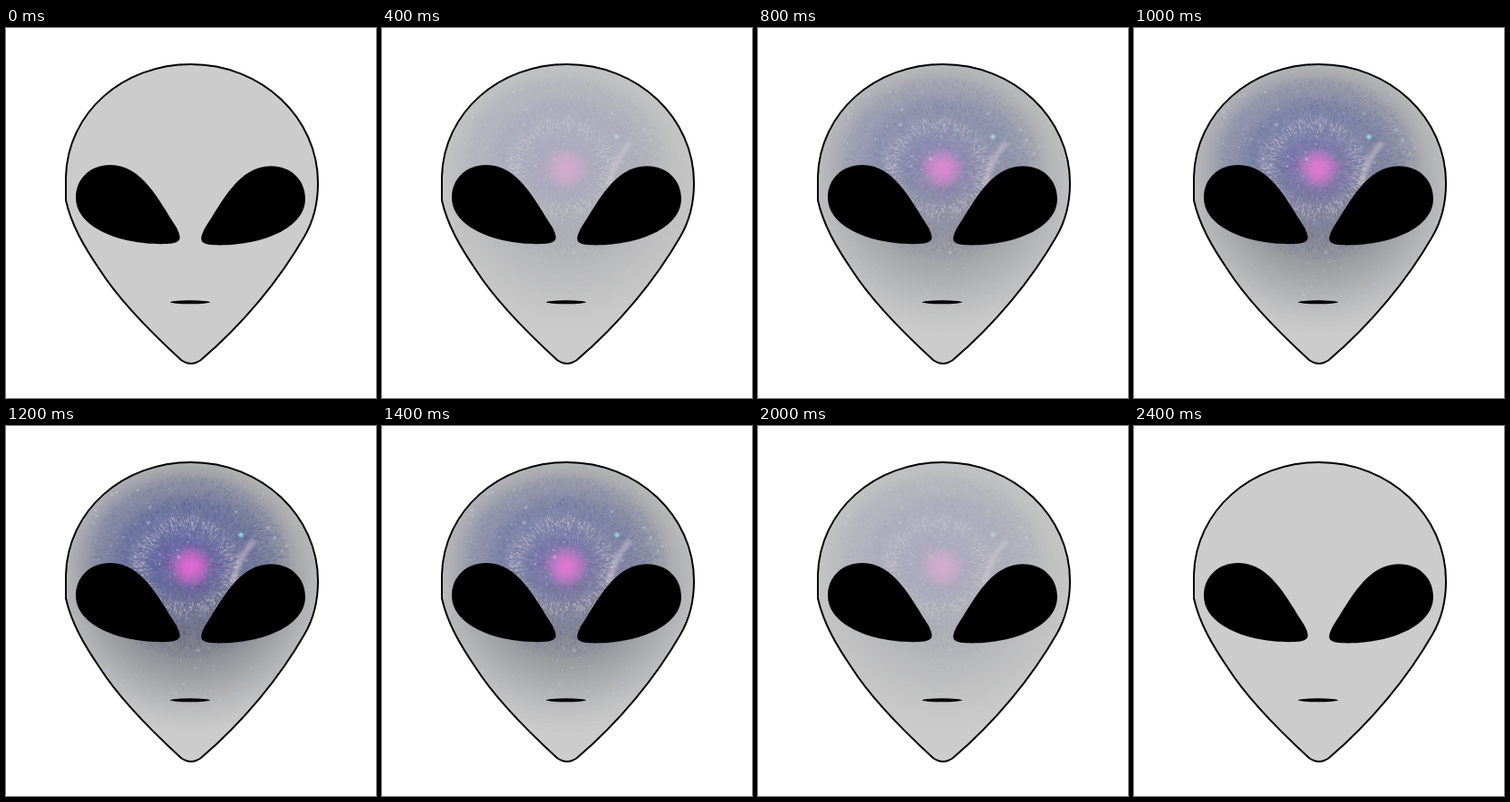
These frames come from a looping animation (408 by 408 pixels, 2.6 s). An HTML page with a canvas:

```html
<!DOCTYPE html>
<html lang="en">
<head>
<meta charset="utf-8">
<title>Alien</title>
<style>
html, body { margin: 0; height: 100%; overflow: hidden; background: #fff; }
canvas { display: block; }
</style>
</head>
<body>
<canvas id="stage" width="408" height="408"></canvas>
<script>
const SIZE = 408, STEP = 200, STEPS = 13, PEAK = 6, TAU = Math.PI * 2;
const CORE = { x: 203, y: 155 };
const ctx = document.getElementById('stage').getContext('2d');

const head = new Path2D(`M204 40 C282 40 344 99 344 171 C344 194 339 213 329 230
  C302 277 262 326 215 366 Q204 374 193 366 C157 333 124 299 103 266
  C86 241 72 217 66 190 V164 C68 93 129 40 204 40Z`);
const eye = new Path2D(`M77 187 C77 166 93 151 115 151 C150 151 168 189 188 220
  C194 232 194 237 178 238 C131 240 77 222 77 187Z`);

let seed = 11;
function rand() {
  seed = (seed * 16807) % 2147483647;
  return seed / 2147483647;
}
const between = (a, b) => a + (b - a) * rand();
const mix = (a, b, t) => a.map((v, i) => v + (b[i] - v) * t);
const rgba = (color, alpha) => `rgba(${color.map(Math.round)},${alpha})`;
const bump = (x, width) => Math.exp(-((x / width) ** 2));

// Ellipse that fades smoothly from its centre to nothing at its rim
function glow(g, x, y, rx, ry, color, alpha) {
  g.save();
  g.translate(x, y);
  g.scale(rx, ry);
  const fill = g.createRadialGradient(0, 0, 0, 0, 0, 1);
  for (let t = 0; t <= 1; t += 0.125) fill.addColorStop(t, rgba(color, alpha * (1 - t * t) ** 1.5));
  g.fillStyle = fill;
  g.fillRect(-1, -1, 2, 2);
  g.restore();
}

// Pink heart, cream ring, blue surroundings and a pale outer shell at upper left
function dustColor(r, angle) {
  const ring = bump(r - 50 + 5 * Math.cos(angle), 12);
  const shell = 0.6 * bump(r - 90, 9) * Math.max(0, Math.cos(angle + 2.3));
  const light = Math.min(1, (ring + shell) * between(0.35, 1.1));
  const dust = mix([88, 98, 160], [218, 204, 206], light);
  const shade = between(-28, 28);
  return mix(dust, [192, 88, 186], bump(r, 26)).map(v => v + shade);
}

function drawNebula(g) {
  glow(g, 203, 168, 172, 172, [106, 108, 116], 1);
  glow(g, 192, 138, 130, 96, [100, 110, 168], 0.9);

  for (let i = 0; i < 9000; i++) {
    const angle = between(0, TAU), r = 108 * Math.sqrt(rand()), end = r + between(1.5, 5);
    const x = Math.cos(angle), y = 0.92 * Math.sin(angle);
    g.strokeStyle = rgba(dustColor(r, angle), 0.6 * (1 - (r / 116) ** 2));
    g.beginPath();
    g.moveTo(CORE.x + x * r, CORE.y + y * r);
    g.lineTo(CORE.x + x * end, CORE.y + y * end);
    g.stroke();
  }

  g.filter = 'blur(2px)';
  g.lineWidth = 6;
  g.strokeStyle = 'rgba(210,196,204,.6)';
  g.stroke(new Path2D('M274 126 Q256 145 250 172'));
  g.filter = 'none';
  glow(g, CORE.x, CORE.y, 25, 25, [226, 104, 210], 0.95);

  for (let i = 0; i < 240; i++) {
    const size = 0.6 + 1.4 * rand() ** 4;
    glow(g, between(84, 326), between(66, 303), size * 1.5, size * 1.5,
      mix([150, 200, 225], [205, 200, 220], rand()), between(0.3, 0.8));
  }
  glow(g, 259, 120, 4, 4, [140, 215, 220], 1);
}

const nebula = document.createElement('canvas');
nebula.width = nebula.height = SIZE;
drawNebula(nebula.getContext('2d'));

function draw(time) {
  const step = Math.floor(time / STEP) % STEPS;
  ctx.fillStyle = '#fff';
  ctx.fillRect(0, 0, SIZE, SIZE);
  ctx.fillStyle = '#ccc';
  ctx.fill(head);

  ctx.save();
  ctx.clip(head);
  ctx.globalAlpha = 1 - Math.abs(PEAK - step) / PEAK;
  ctx.drawImage(nebula, 0, 0);
  ctx.restore();

  ctx.lineWidth = 2;
  ctx.strokeStyle = ctx.fillStyle = '#000';
  ctx.stroke(head);
  ctx.fill(eye);
  ctx.save();
  ctx.translate(407, 1.3);
  ctx.scale(-1, 1);
  ctx.fill(eye);
  ctx.restore();
  ctx.beginPath();
  ctx.ellipse(203, 302.3, 22, 2, 0, 0, TAU);
  ctx.fill();
}

const start = performance.now();
function tick() {
  draw(performance.now() - start);
  requestAnimationFrame(tick);
}
tick();
</script>
</body>
</html>
```
